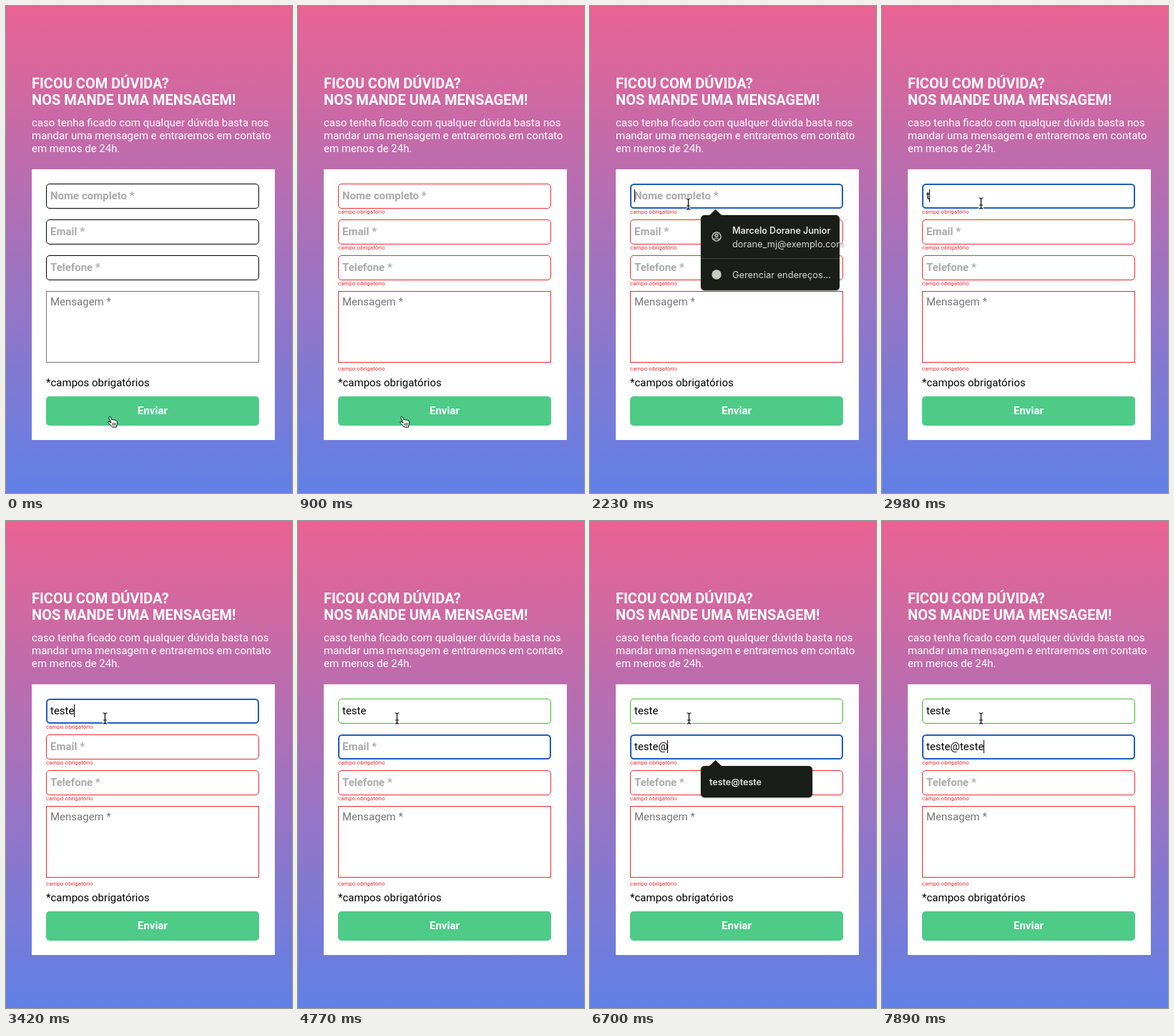
An HTML page for the animation above (8000 ms loop, 400x680 px).

```html
<!DOCTYPE html>
<html lang="pt-BR">
<head>
<meta charset="utf-8">
<title>Formulário de contato</title>
<style>
  html, body { margin: 0; width: 100%; height: 100%; overflow: hidden; }
  svg { display: block; width: 400px; height: 680px; font: 15px Roboto, sans-serif; }
  .bold { font-weight: 700; }
  .title { font-size: 20px; font-weight: 700; }
  .hint { fill: #a9a9a9; font-weight: 700; }
  .error { fill: #ee2b2f; font-size: 8px; }
  .box { fill: #fff; stroke: #000; }
  .box.area { stroke: #767676; }
  .box.bad, .box.area.bad { stroke: #ee2b2f; }
  .box.good { stroke: #45b82c; }
  .box.focus { stroke: #1f5dc2; stroke-width: 2; }
  .popup { font: 12.8px Inter, sans-serif; fill: #d3d7cf; filter: drop-shadow(0 1px 1px rgba(0, 0, 0, .35)); }
  .popup .strong { font-size: 12.5px; font-weight: 600; fill: #e3e6df; }
  .popup .panel { fill: #191e18; }
  .cursor { stroke-linejoin: round; stroke-linecap: round; }
  .off { display: none; }
</style>
</head>
<body>
<svg viewBox="0 0 400 680">
  <defs>
    <linearGradient id="sky" x1="0" y1="0" x2="0" y2="1">
      <stop offset="0" stop-color="#e96392"/>
      <stop offset="1" stop-color="#6080e6"/>
    </linearGradient>
  </defs>
  <rect width="400" height="680" fill="url(#sky)"/>
  <g fill="#fff">
    <text class="title" x="36" y="115">FICOU COM DÚVIDA?</text>
    <text class="title" x="36" y="138">NOS MANDE UMA MENSAGEM!</text>
    <text x="36" y="168">caso tenha ficado com qualquer dúvida basta nos</text>
    <text x="36" y="186">mandar uma mensagem e entraremos em contato</text>
    <text x="36" y="204">em menos de 24h.</text>
    <rect x="36" y="228" width="340" height="378"/>
  </g>
  <g id="fields"></g>
  <text x="56" y="531">*campos obrigatórios</text>
  <rect x="56" y="545" width="298" height="41" rx="5" fill="#4dcb87"/>
  <text class="bold" x="205" y="570" fill="#fff" text-anchor="middle">Enviar</text>
  <rect id="caret" width="1" height="18"/>

  <g class="popup">
    <path class="panel" d="M166 293L175.5 284L185 293Z"/>
    <rect class="panel" x="155" y="292" width="194" height="105" rx="5"/>
    <path d="M155 352.5H349" stroke="#3d4a3a"/>
    <g fill="none" stroke="#c6cac2" stroke-width="1.4">
      <circle cx="177" cy="322" r="6"/>
      <circle cx="177" cy="320.4" r="1.9"/>
      <path d="M173 326.3C175 324 179 324 181 326.3"/>
    </g>
    <circle cx="177" cy="375" r="6.7" fill="#c6cac2"/>
    <text class="strong" x="199" y="318">Marcelo Dorane Junior</text>
    <text x="199" y="337">dorane_mj@exemplo.com</text>
    <text x="199" y="380">Gerenciar endereços...</text>
  </g>
  <g class="popup">
    <path class="panel" d="M166 343L175.5 334L185 343Z"/>
    <rect class="panel" x="155" y="342" width="156" height="44" rx="5"/>
    <text class="strong" x="167" y="369">teste@teste</text>
  </g>

  <g class="cursor" id="hand" fill="#fff" stroke="#000">
    <path d="M5.6 9L3 3.2C2.4 1.6 4.6 .8 5.3 2.2L7.2 6C8 5 9.2 5.3 9.6 6.2C10.4 5.4 11.8 5.7 12.1 6.8C13 6.2 14.2 6.8 14.4 8C14.9 10 15 12 13.6 14V16H7.6C6.6 14 4 12.4 2.4 10.6C1 9 2.6 7.8 4 8.8L5.8 10Z"/>
    <path d="M8.3 10.5V13.5M10.2 10.5V13.5M12 10.3V13.5" fill="none" stroke-width=".8"/>
  </g>
  <g class="cursor" id="arrow" fill="#000" stroke="#fff">
    <path d="M0 0V13.4L3.1 10.6L5.2 15.6L7.6 14.6L5.5 9.7H9.6Z"/>
  </g>
  <g class="cursor" id="beam" fill="none">
    <path id="stem" d="M-2.5 -7.5Q0 -7.5 0 -5.5Q0 -7.5 2.5 -7.5M0 -5.5V5.5M-2 2.5H2M-2.5 7.5Q0 7.5 0 5.5Q0 7.5 2.5 7.5" stroke="#fff" stroke-width="2.8"/>
    <use href="#stem" style="stroke:#000"/>
    <path d="M-2.5 -7.5Q0 -7.5 0 -5.5Q0 -7.5 2.5 -7.5M0 -5.5V5.5M-2 2.5H2M-2.5 7.5Q0 7.5 0 5.5Q0 7.5 2.5 7.5" stroke="#000" stroke-width="1.2"/>
  </g>
</svg>
<script>
const LOOP = 8000;
const $ = id => document.getElementById(id);
const show = (el, on) => el.classList.toggle('off', !on);

// Fields: top, height, label, baseline of the error line
const layout = [
  [248, 35, 'Nome completo *', 290],
  [298, 35, 'Email *', 340],
  [348, 35, 'Telefone *', 390],
  [398, 100, 'Mensagem *', 509]
];
$('fields').innerHTML = layout.map(([y, h, label, errY], i) => {
  const area = i === 3;
  const base = y + (area ? 20 : 22);
  return `<rect class="box ${area ? 'area' : ''}" x="56.5" y="${y + .5}" width="297" height="${h - 1}" rx="${area ? 0 : 4.5}"/>
    <text ${area ? 'fill="#757575"' : 'class="hint"'} x="62" y="${base}">${label}</text>
    <text class="value" x="62" y="${base}"></text>
    <text class="error" x="56" y="${errY}">campo obrigatório</text>`;
}).join('');

const all = sel => [...document.querySelectorAll(sel)];
const boxes = all('.box'), values = all('.value'), errors = all('.error'), popups = all('.popup');
const hints = values.map(v => v.previousElementSibling);

// Each step changes only the listed parts of the state
const start = { cursor: ['hand', 141, 572], checked: false, focus: -1, caret: false, popup: -1, name: '', email: '' };
const steps = [
  [900, { checked: true }],
  [1340, { cursor: ['hand', 141, 568] }],
  [1490, { cursor: ['arrow', 143, 534] }],
  [1640, { cursor: ['beam', 142, 462] }],
  [1780, { cursor: ['beam', 140, 372] }],
  [1930, { cursor: ['beam', 138, 314] }],
  [2080, { cursor: ['arrow', 137, 282.5] }],
  [2230, { cursor: ['beam', 137.5, 276.5], focus: 0, caret: true, popup: 0 }],
  [2380, { cursor: ['beam', 138.5, 275.5] }],
  [2680, { caret: false }],
  [2980, { name: 't', caret: true, popup: -1 }],
  [3130, { name: 'te' }],
  [3270, { name: 'test' }],
  [3420, { name: 'teste' }],
  [3870, { caret: false }],
  [4170, { caret: true }],
  [4320, { focus: 1 }],
  [4770, { caret: false }],
  [5370, { email: 't', caret: true }],
  [5510, { email: 'te', popup: 1 }],
  [5810, { email: 'tes' }],
  [5960, { email: 'teste' }],
  [6400, { caret: false }],
  [6700, { email: 'teste@', caret: true }],
  [7150, { caret: false }],
  [7600, { email: 'teste@t', caret: true }],
  [7740, { email: 'teste@tes' }],
  [7890, { email: 'teste@teste', popup: -1 }]
];

const stateAt = t => Object.assign({}, start, ...steps.filter(s => s[0] <= t).map(s => s[1]));

function outline(box, i, focused, good, bad) {
  const [y, h] = layout[i];
  const inset = focused ? 1 : .5;
  box.setAttribute('x', 56 + inset);
  box.setAttribute('y', y + inset);
  box.setAttribute('width', 298 - 2 * inset);
  box.setAttribute('height', h - 2 * inset);
  box.classList.toggle('focus', focused);
  box.classList.toggle('good', good);
  box.classList.toggle('bad', bad);
}

function draw(t) {
  const s = stateAt(t);
  const typed = [s.name, s.email, '', ''];
  boxes.forEach((box, i) => {
    const focused = s.focus === i;
    const good = i < s.focus;
    outline(box, i, focused, good, s.checked && !good && !focused);
    values[i].textContent = typed[i];
    show(hints[i], !typed[i]);
    show(errors[i], s.checked && !good);
  });
  popups.forEach((p, i) => show(p, s.popup === i));

  show($('caret'), s.caret);
  if (s.caret) {
    const width = typed[s.focus] ? values[s.focus].getComputedTextLength() : 0;
    $('caret').setAttribute('x', Math.floor(62 + width));
    $('caret').setAttribute('y', layout[s.focus][0] + 8);
  }

  const [kind, x, y] = s.cursor;
  for (const id of ['hand', 'arrow', 'beam']) show($(id), id === kind);
  $(kind).setAttribute('transform', `translate(${x} ${y})`);
}

const t0 = performance.now();
function tick() {
  draw((performance.now() - t0) % LOOP);
  requestAnimationFrame(tick);
}
tick();
</script>
</body>
</html>
```
